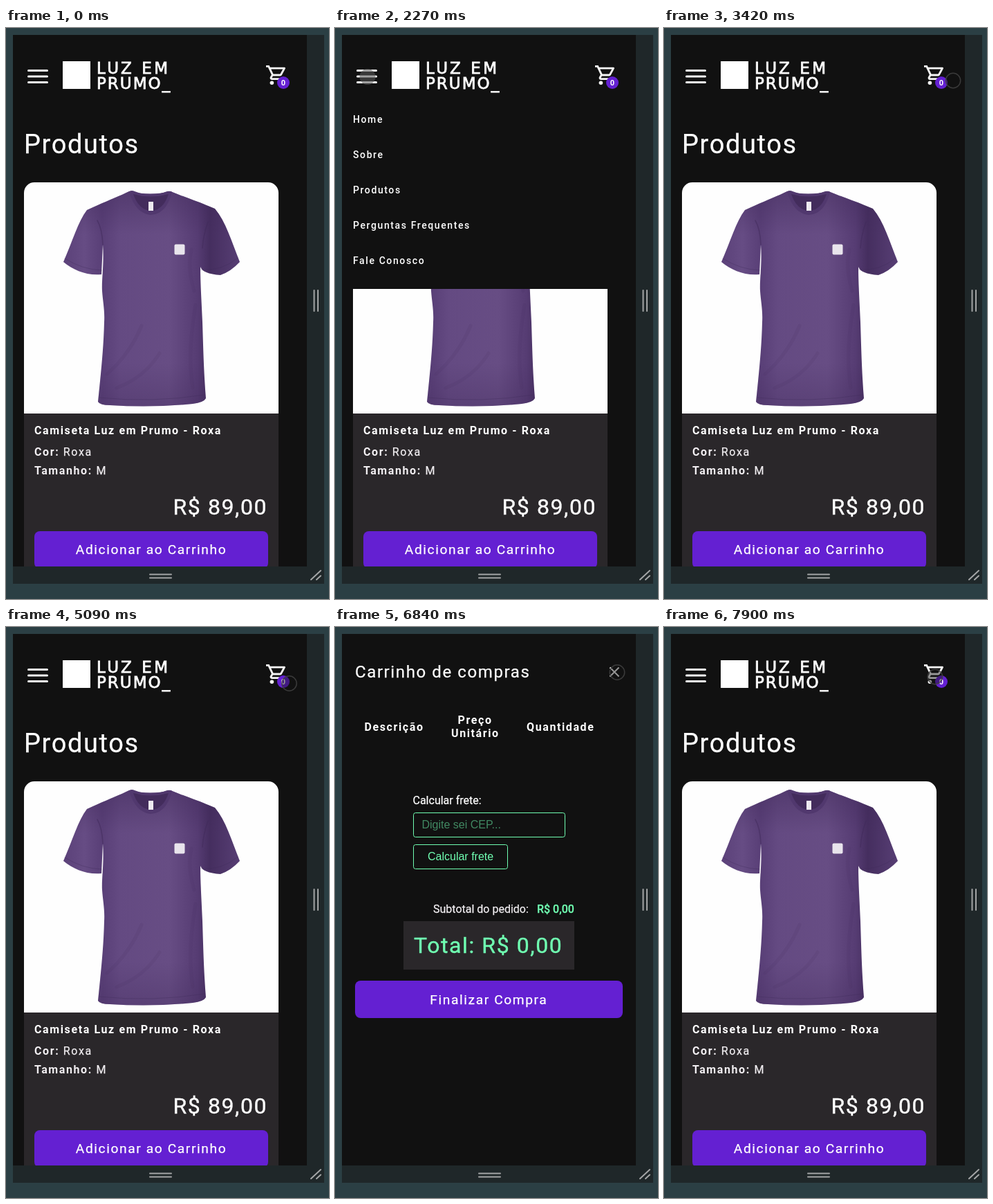
Animation of 467x825 px, one loop 7.99 s. Source, as an HTML page:

```html
<!DOCTYPE html>
<html lang="pt-BR">
<head>
<meta charset="utf-8">
<title>Loja - Produtos</title>
<style>
  html, body { margin: 0; width: 100%; height: 100%; overflow: hidden; background: #2b3f44; }
  svg { display: block; width: 100%; height: 100%; }
  text {
    font-family: Roboto, sans-serif; font-size: 16px; letter-spacing: 1.6px; white-space: pre;
    color: #fff; fill: currentColor; stroke: currentColor; stroke-width: .25px;
  }
  .b { font-weight: 700; stroke: none; }
  .h1 { font-size: 38px; }
  .big { font-size: 32px; stroke-width: .4px; }
  .btn { font-size: 19.2px; }
  .menu text { font-size: 14px; font-weight: 500; stroke: none; }
  .info { color: #f2eff2; }
  .tight { letter-spacing: 0; }
  .sys { font-family: "Liberation Sans", Arial, sans-serif; letter-spacing: 0; stroke: none; }
  .green { color: #70ffb2; }
  .box { fill: none; stroke: #70ffb2; }
  .mark { font: 23px "DejaVu Sans", sans-serif; stroke-width: .8px; }
  .purple { fill: #6420d2; }
</style>
</head>
<body>
<svg viewBox="0 0 467 825" preserveAspectRatio="none">
  <defs>
    <clipPath id="screen"><rect x="10" y="10" width="425" height="768"/></clipPath>
    <linearGradient id="cloth">
      <stop offset="0" stop-color="#5b4179"/>
      <stop offset=".12" stop-color="#664c84"/>
      <stop offset=".22" stop-color="#593f77"/>
      <stop offset=".32" stop-color="#644a82"/>
      <stop offset=".6" stop-color="#674d84"/>
      <stop offset=".76" stop-color="#563c73"/>
      <stop offset=".83" stop-color="#452e5f"/>
      <stop offset="1" stop-color="#573e74"/>
    </linearGradient>
    <linearGradient id="fold" x1="0" y1="0" x2="0" y2="1">
      <stop offset="0" stop-color="#3f2858" stop-opacity=".45"/>
      <stop offset=".2" stop-color="#3f2858" stop-opacity="0"/>
      <stop offset=".8" stop-color="#3f2858" stop-opacity="0"/>
      <stop offset="1" stop-color="#3f2858" stop-opacity=".3"/>
    </linearGradient>
    <path id="shirt" d="M178 236 C162 244 138 253 117 263 C104 280 97 306 83 338
      C98 350 116 358 138 356 L140 313 C142 340 138 365 139 380
      C140 395 143 408 142 425 C141 465 137 500 133 540 Q136 545 150 545
      Q211 549 270 543 Q286 541 289 535 C286 500 285 455 284 425
      C283 400 281 370 281 345 Q284 355 310 357 Q325 352 338 338
      C326 308 318 280 302 261 C281 252 257 244 238 236 Q209 243 178 236 Z"/>
  </defs>

  <rect x="10" y="10" width="450" height="793" fill="#1f2729"/>
  <path d="M445.5 379V409M451 379V409M208 789.5H239M208 794.5H239M441 797L455 784M449 797L455 791.5"
    stroke="#a3a5a6" stroke-width="2" stroke-linecap="round"/>

  <g clip-path="url(#screen)">
    <rect x="10" y="10" width="425" height="768" fill="#111"/>

    <path d="M32.5 61.5H59.5M32.5 70H59.5M32.5 78.5H59.5" stroke="#f5f5f5" stroke-width="3" stroke-linecap="round"/>
    <rect x="82" y="48" width="40" height="40" fill="#fff"/>
    <text class="mark" x="131" y="66" style="letter-spacing:3.5px">LUZ EM</text>
    <text class="mark" x="131" y="87.5" style="letter-spacing:2px">PRUMO_</text>

    <path transform="translate(374.6 51.2) scale(1.4)" fill="#f5f5f5" d="M15.55 13c.75 0 1.41-.41 1.75-1.03l3.58-6.49c.37-.66-.11-1.48-.87-1.48H5.21l-.94-2H1v2h2l3.6 7.59-1.35 2.44C4.52 15.37 5.48 17 7 17h12v-2H7l1.1-2h7.45zM6.16 6h12.15l-2.76 5H8.53z"/>
    <circle cx="384.4" cy="79.2" r="2.8" fill="#f5f5f5"/>
    <circle cx="398.4" cy="79.2" r="2.8" fill="#f5f5f5"/>
    <circle class="purple" cx="401" cy="79" r="9"/>
    <text class="b tight" x="401" y="83" text-anchor="middle" style="font-size:11px">0</text>

    <text class="h1" x="26" y="180.5">Produtos</text>

    <path d="M26 557V238A15 15 0 0 1 41 223H379A15 15 0 0 1 394 238V557Z" fill="#fefefe"/>
    <use href="#shirt" fill="url(#cloth)"/>
    <use href="#shirt" fill="url(#fold)"/>
    <g fill="none" stroke="#412b5a" stroke-linecap="round">
      <path d="M140 313Q139 290 132 278M284 318Q285 300 292 280" stroke-width="1.5" stroke-opacity=".5"/>
      <path d="M85 333Q110 349 138 350M282 349Q312 352 335 332M135 534Q211 542 287 530" stroke-opacity=".35"/>
      <path d="M146 500Q180 470 196 430M270 520Q262 470 274 400M160 520Q200 505 222 470M272 380Q262 345 268 320" stroke-width="5" stroke-opacity=".12"/>
    </g>
    <path d="M178 236Q182 234 186 236Q209 245 233 236Q238 235 240 237Q232 269 209 270Q187 268 178 236Z" fill="#51386e"/>
    <path d="M184 240Q209 247 235 240Q227 264 209 264Q192 263 184 240Z" fill="#432c5c"/>
    <rect x="206" y="251" width="7" height="13" fill="#eeeaf0"/>
    <rect x="243.5" y="312.5" width="15" height="15" rx="2" fill="#e8e4ec"/>

    <rect x="26" y="557" width="368" height="221" fill="#2a272a"/>
    <text class="b" x="41" y="587">Camiseta Luz em Prumo - Roxa</text>
    <text class="info" x="41" y="618"><tspan class="b">Cor:</tspan> Roxa</text>
    <text class="info" x="41" y="645"><tspan class="b">Tamanho:</tspan> M</text>
    <text class="big" x="241.5" y="702.5">R$ 89,00</text>
    <rect class="purple" x="41" y="727" width="338" height="54" rx="8"/>
    <text class="btn" x="100.8" y="760">Adicionar ao Carrinho</text>

    <g id="menu" class="menu" opacity="0">
      <rect x="26" y="108" width="368" height="269" fill="#111"/>
    </g>

    <g id="cart" opacity="0">
      <rect x="10" y="10" width="425" height="768" fill="#111"/>
      <text x="29" y="73" style="font-size:24px">Carrinho de compras</text>
      <path d="M397.5 58.5L410.5 71.5M410.5 58.5L397.5 71.5" stroke="#f5f5f5" stroke-width="2"/>
      <text class="b" x="42.5" y="150">Descrição</text>
      <text class="b" x="177.5" y="140">Preço</text>
      <text class="b" x="168" y="159">Unitário</text>
      <text class="b" x="277" y="150">Quantidade</text>

      <text class="tight" x="112.5" y="256">Calcular frete:</text>
      <rect class="box" x="113.5" y="268.5" width="219" height="35" rx="3"/>
      <text class="sys green" x="125.5" y="291" opacity=".5">Digite sei CEP...</text>
      <rect id="caret" x="126" y="278" width="1" height="17" fill="#fff"/>
      <rect class="box" x="113.5" y="314.5" width="136" height="35" rx="3"/>
      <text class="sys green" x="134" y="337">Calcular frete</text>

      <text class="tight info" x="142" y="413">Subtotal do pedido:</text>
      <text class="tight green" x="292" y="413" font-weight="500">R$ 0,00</text>
      <rect x="99" y="425" width="247" height="70" fill="#2a272a"/>
      <text class="big green" x="114" y="471">Total: R$ 0,00</text>
      <rect class="purple" x="29" y="511" width="387" height="54" rx="8"/>
      <text class="btn" x="137.3" y="544.5">Finalizar Compra</text>
    </g>

    <g id="touch">
      <circle id="hover" r="10.7" fill="#141414" fill-opacity=".42" stroke="#424242" stroke-opacity=".85" stroke-width="1.5"/>
      <circle id="press" r="11.5" fill="#595959" fill-opacity=".55"/>
    </g>
  </g>
</svg>
<script>
const LOOP = 7990;
const $ = id => document.getElementById(id);
const [menu, cart, caret, touch, hover, press] =
  ['menu', 'cart', 'caret', 'touch', 'hover', 'press'].map($);

['Home', 'Sobre', 'Produtos', 'Perguntas Frequentes', 'Fale Conosco'].forEach((label, i) => {
  const item = document.createElementNS(menu.namespaceURI, 'text');
  item.setAttribute('x', 26);
  item.setAttribute('y', 137 + 51 * i);
  item.textContent = label;
  menu.append(item);
});

// [time, opacity]: each value holds until the next
const levels = [
  [menu, [[1540, .3], [1640, .75], [1740, 1], [2470, .4], [2600, 0]]],
  [cart, [[5310, .5], [5440, 1], [7320, .5], [7370, 0]]],
  [caret, [[5310, 1], [5840, 0], [6310, 1], [6840, 0]]],
  [press, [[1280, .5], [1340, 1], [1540, 0], [2140, .5], [2270, 1], [2470, 0]]],
];

// [first step, last step, step count, end x, end y, eased]
const start = [419, 822];
const moves = [
  [70, 400, 6, -15, 125],
  [700, 700, 1, -15, 81],
  [730, 1080, 6, 47, 70.5],
  [2870, 3420, 9, 418, 76, true],
  [3490, 3490, 1, 430, 75],
  [3560, 3630, 2, 421, 73],
  [3700, 3900, 3, 416, 80.5],
  [4300, 4630, 4, 411, 81],
  [4830, 5090, 3, 409.5, 81.5],
  [6040, 6110, 2, 408, 65.5],
  [7900, 7900, 1, 392, 72],
];

function levelAt(steps, t) {
  let value = 0;
  for (const [at, v] of steps) if (t >= at) value = v;
  return value;
}

function pointAt(t) {
  let [x, y] = start;
  for (const [from, to, n, ex, ey, eased] of moves) {
    if (t < from) break;
    const gap = n > 1 ? (to - from) / (n - 1) : 1;
    let p = Math.min(n, Math.floor((t - from) / gap + 1e-6) + 1) / n;
    if (eased) p = p * p * (3 - 2 * p);
    x += (ex - x) * p;
    y += (ey - y) * p;
  }
  return [x, y];
}

function draw(now) {
  const t = now % LOOP;
  for (const [el, steps] of levels) el.setAttribute('opacity', levelAt(steps, t));
  hover.setAttribute('opacity', 1 - press.getAttribute('opacity'));
  touch.setAttribute('transform', `translate(${pointAt(t)})`);
  touch.setAttribute('visibility', t < 70 ? 'hidden' : 'visible');
}

function tick(now) {
  draw(now);
  requestAnimationFrame(tick);
}
draw(0);
requestAnimationFrame(tick);
</script>
</body>
</html>
```
